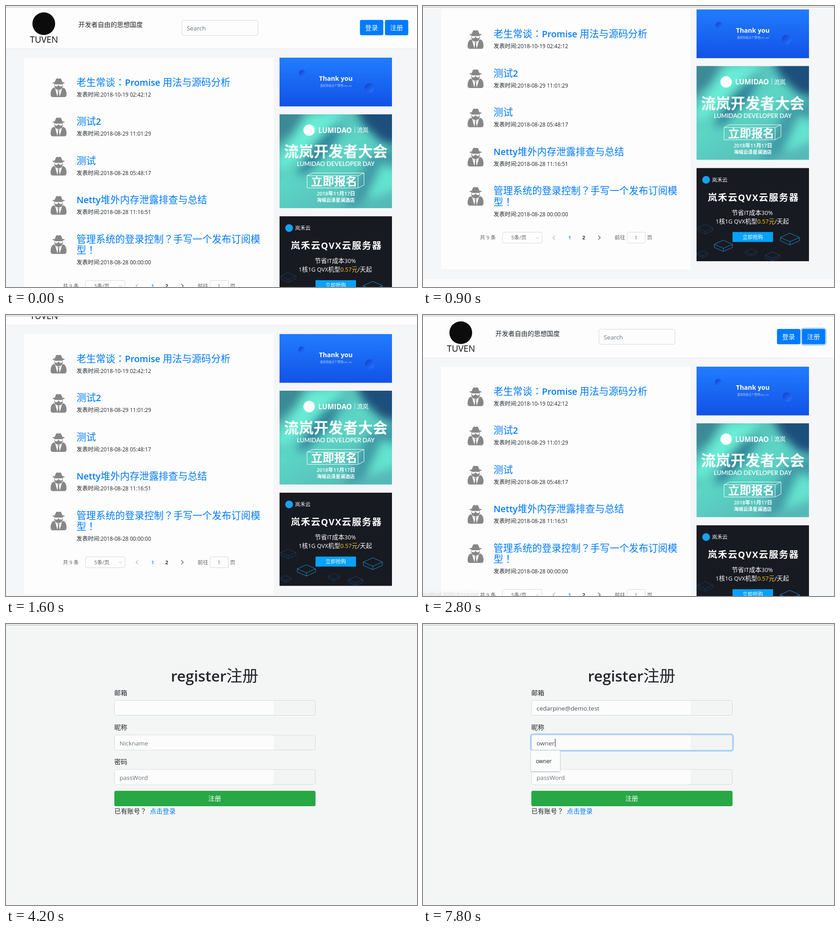
Recreate the animation shown at these times as an HTML page. Size 903x620 px, loop 8 s.

```html
<!DOCTYPE html>
<html lang="zh-CN">
<head>
<meta charset="utf-8">
<title>Community page</title>
<style>
html, body { margin: 0; width: 100%; height: 100%; overflow: hidden; background: #f4f6f6; }
svg { display: block; }
text { font-family: "Open Sans", "Noto Sans CJK SC", sans-serif; white-space: pre; }
tspan { font-size: 95%; }
.head tspan { font-size: 93%; font-weight: 600; }
.price { font-size: 100%; fill: #ffd21f; }
.mark, .head .mark { font-family: "Noto Sans CJK JP", sans-serif; font-size: 100%; font-weight: 400; }
</style>
</head>
<body>
<svg id="stage" width="903" height="620" viewBox="0 0 903 620">
  <defs>
    <linearGradient id="blue" x2="0" y2="1"><stop stop-color="#217cff"/><stop offset="1" stop-color="#1252e6"/></linearGradient>
    <linearGradient id="ball" x2="1" y2="1"><stop stop-color="#0b3fd0"/><stop offset="1" stop-color="#2b78ff"/></linearGradient>
    <linearGradient id="sky" x2=".7" y2="1"><stop stop-color="#4aa3ab"/><stop offset=".5" stop-color="#5cd6c5"/><stop offset="1" stop-color="#55b9b7"/></linearGradient>
    <filter id="blur" x="-50%" y="-50%" width="200%" height="200%"><feGaussianBlur stdDeviation="10"/></filter>
    <filter id="drop" x="-20%" y="-20%" width="140%" height="140%"><feDropShadow dx="0" dy="1" stdDeviation="1.5" flood-opacity=".35"/></filter>
    <g id="spy">
      <path fill="#878787" d="M9 9 12 2Q13.500 0 17.500 1.500 21.500 0 23 2L26 9Q31 9.500 31 10.500 31 12.500 17.500 12.500 4 12.500 4 10.500 4 9.500 9 9ZM8 12.500H27V17Q26 23 22 25L17.500 27 13 25Q9 23 8 17ZM7 21Q0 24 0 36 0 42 5 42H30Q35 42 35 36 35 24 28 21L17.500 28Z"/>
      <path fill="#fdfdfd" d="M8.500 14H26.500V16Q25 19 22 18.500 19 18.500 18.300 15.500H16.700Q16 18.500 13 18.500 10 19 8.500 16ZM10 23.500 15 41 16.500 30 15 27.500 17.500 26.500 20 27.500 18.500 30 20 41 25 23.500 17.500 27Z"/>
    </g>
  </defs>
  <g id="home"></g>
  <g id="form"></g>
  <rect width="903" height="2" fill="#fdfdfd"/>
  <rect y="1.700" width="903" height="1.300" fill="#b9b9bb"/>
</svg>
<script>
const $ = id => document.getElementById(id);
const INK = '#212529', LINK = '#007bff', MUTED = '#6c757d', GREY = '#999', LINE = '#d3d7db';

// Latin runs are set a little smaller than the CJK around them; {…} marks the price.
const text = (x, y, size, str, fill = INK, attrs = '') =>
  `<text x="${x}" y="${y}" font-size="${size}" fill="${fill}" ${attrs}>` +
  str.replace(/[ -z|~]+/g, '<tspan>$&</tspan>')
    .replace(/[：？！]/g, '<tspan class="mark" lang="ja">$&</tspan>')
    .replace('{', '<tspan class="price">').replace('}', '</tspan>') + '</text>';
const mid = (x, y, size, str, fill, attrs = '') => text(x, y, size, str, fill, 'text-anchor="middle" ' + attrs);
const rect = (x, y, w, h, fill, attrs = '') =>
  `<rect x="${x}" y="${y}" width="${w}" height="${h}" fill="${fill}" ${attrs}/>`;
const field = (x, y, w, h, fill = '#fdfdfd') => rect(x + .5, y + .5, w - 1, h - 1, fill, `rx="3.5" stroke="${LINE}"`);
const circle = (x, y, r, fill, attrs = '') => `<circle cx="${x}" cy="${y}" r="${r}" fill="${fill}" ${attrs}/>`;
const path = (d, stroke, attrs = '') => `<path d="${d}" fill="none" stroke="${stroke}" ${attrs}/>`;
const ring = (id, x, y, w, h) =>
  rect(x - 1.3, y - 1.3, w + 2.6, h + 2.6, 'none', `id="${id}" rx="5" stroke="#80bdff" stroke-opacity=".65" stroke-width="3.2"`);

function header() {
  return rect(0, 0, 903, 94, '#fdfdfd') + rect(0, 94, 903, 1, '#e6e8f1') +
    circle(83, 39, 25, '#0c0c0c') + mid(83.5, 81, 20.5, 'TUVEN', '#111') +
    text(159, 46, 14.15, '开发者自由的思想国度') +
    field(386, 31, 168, 34) + text(397, 54, 14.15, 'Search', MUTED) +
    rect(777.7, 30.8, 51.3, 33.8, LINK, 'rx="3.5"') + mid(803.2, 53, 14.15, '登录', '#fff') +
    rect(832.5, 30.8, 51.3, 33.8, LINK, 'rx="3.5" id="join"') + mid(858, 53, 14.15, '注册', '#fff') +
    ring('joinRing', 832.5, 30.8, 51.3, 33.8);
}

function posts() {
  const list = [
    ['老生常谈：Promise 用法与源码分析', '2018-10-19 02:42:12'],
    ['测试2', '2018-08-29 11:01:29'],
    ['测试', '2018-08-28 05:48:17'],
    ['Netty堆外内存泄露排查与总结', '2018-08-28 11:16:51'],
    ['管理系统的登录控制？手写一个发布订阅模|型！', '2018-08-28 00:00:00']];
  return list.map(([title, date], i) => {
    const y = i * 86.5, lines = title.split('|'), last = (lines.length - 1) * 24.6;
    return `<use href="#spy" x="98" y="${159 + y}"/>` +
      lines.map((s, n) => text(155, 175.5 + y + n * 24.6, 21.25, s, LINK, 'class="head"')).join('') +
      text(155, 199.5 + y + last, 12.4, '发表时间:' + date);
  }).join('');
}

function pager() {
  const y = 621.5, c = '#606266', bold = 'font-weight="700"';
  return text(125, y, 11.5, '共 9 条', c) + field(174, 605, 88, 25) + text(194, y, 11.5, '5条/页', c) +
    path('M247.500 616l3.500 3.500 3.500-3.500', '#b8bcc4') +
    path('M290 613l-4.500 4.500 4.500 4.500', '#a8abb2', 'stroke-width="1.2"') +
    mid(322, y, 11.5, '1', '#409eff', bold) + mid(353, y, 11.5, '2', '#303133', bold) +
    path('M385 613l4.500 4.500-4.500 4.500', '#444', 'stroke-width="1.2"') +
    text(421, y, 11.8, '前往', c) + field(448, 605, 41, 25) + mid(468, y, 11.8, '1', c) + text(492, y, 11.8, '页', c);
}

function thanks() {
  return rect(601, 114, 247, 107.5, 'url(#blue)') +
    circle(0, 0, 7.5, 'url(#ball)', 'id="ballA"') + circle(0, 0, 10.5, 'url(#ball)', 'id="ballB"') +
    mid(724.7, 165, 14.9, 'Thank you', '#fff', 'font-weight="700"') +
    mid(725, 178, 6.3, '喜欢你就点个赞吧Lan_vo', '#b9d0ff');
}

function aurora() {
  const w = '#fff';
  return `<svg x="601" y="239" width="247" height="207" viewBox="0 0 247 207">
    <rect width="247" height="207" fill="url(#sky)"/>
    <g filter="url(#blur)">
      <path fill="#1d4f7c" d="M165-20H270V70L225 62 185 25Z"/>
      <path fill="#3b8a96" d="M-20-20H60L30 40-20 75Z"/>
      <path fill="#2f8298" d="M90 40 140 25 110 80 60 130 35 135Z"/>
      <path fill="#69ecd5" d="M65 0 150-10 85 55 10 125-10 110Z"/>
      <path fill="#3f9aa5" d="M195 95 260 70V115L205 180 140 215Z"/>
      <path fill="#64e3cf" d="M225 110 260 125V165L190 190Z"/>
    </g></svg>` +
    circle(666, 274, 12.5, w) +
    text(686, 279.5, 16.3, 'LUMIDAO', w, 'font-weight="700"') + path('M766.500 266v14', '#d5f3f0') +
    text(771, 278, 12.8, '流岚', w) +
    mid(724.5, 333, 32.5, '流岚开发者大会', w, 'font-weight="900"') +
    mid(724.5, 353, 14, 'LUMIDAO DEVELOPER DAY', w, 'font-weight="600" style="font-family:Lato,sans-serif"') +
    path('M661.500 374.500H773.500V401.500H661.500ZL674 368.500H786.500L773.500 374.500M786.500 368.500V395L773.500 401.500', w) +
    mid(721, 396, 25.5, '立即报名', w, 'font-weight="700"') +
    mid(725, 418, 11.5, '2018年11月17日', w, 'font-weight="600"') +
    mid(724.5, 432, 10.4, '海城云泽星澜酒店', w, 'font-weight="700"');
}

function cloud() {
  const chip = (x, y, r, c) => path(`M${x - r} ${y}l${r}-${r * .45} ${r} ${r * .45}-${r} ${r * .45}ZV${y + r * .35}l${r} ${r * .45} ${r}-${r * .45}V${y}M${x} ${y + r * .45}v${r * .35}`, c);
  return rect(601, 464, 247, 205.5, '#181a21') +
    chip(620, 596, 17, '#144064') + chip(660, 632, 20, '#1d8fd8') + chip(806, 617, 21, '#1d8fd8') +
    chip(721, 648, 13, '#153d60') + chip(768, 656, 16, '#134a78') + chip(614, 652, 12, '#153d60') +
    circle(622, 490, 8.5, '#18a1f3') + text(635, 494, 11.4, '岚禾云', '#fff') +
    mid(726, 536, 20.5, '岚禾云QVX云服务器', '#fff', 'font-weight="700" letter-spacing="1.6"') +
    mid(723.5, 567, 13.6, '节省IT成本30%', '#fff') +
    mid(723.5, 586, 13.3, '1核1G QVX机型{0.57元}/天起', '#fff') +
    rect(680, 605, 89, 22, '#06a2fb') + mid(724.5, 620, 11.2, '立即抢购', '#fff');
}

function footer() {
  const y = 807.5, t = (x, y, s, c = GREY) => text(x, y, 11.5, s, c);
  return rect(0, 708.5, 903, 179.5, '#fbfbfb') +
    t(27, 741.5, '顾闻川', '#444') + t(65, 741.5, '|', '#ccc') + t(71, 741.5, '源码地址', '#444') +
    t(27, 762, '技术开发者的社区，持续更新完善，测试版本V1.0。') +
    t(27, y, '服务器赞助商为') + text(112, y + 4, 19.5, 'VORELA', '#45474f', 'font-weight="800"') +
    t(195, y, '，存储赞助商为') + circle(305, 804.5, 16, '#12a5e4') +
    text(331, 803, 16, '九禾云', '#12a5e4', 'font-weight="700"') +
    text(331, 819, 17, 'JOVEL', '#12a5e4', 'font-weight="700"') +
    t(383, y, '，由') + circle(428, 804.5, 19, '#6262d2') + text(453, 812, 27, 'orbimel', '#8787df') +
    t(552, y, '提供应用性能服务。') +
    t(27, 855.5, '仅供开发者学习使用，未经授权，不得商用。联系邮箱：weiqinglabs@mail.test');
}

$('home').innerHTML = '<g id="page">' + rect(0, 0, 903, 900, '#f5f6f8') + header() +
  rect(40, 114, 548, 573, '#fdfdfd') + posts() + pager() + thanks() + aurora() + cloud() + footer() + '</g>' +
  '<g id="status">' + rect(-5, 605, 128, 16, '#f2f2f2') + text(-4, 619.5, 11.5, 'localhost:8080/#/register', '#666') + '</g>';

function input(id, y) {
  return field(238, y, 442, 34, '#f3f5f5') + rect(239, y + 1, 349, 32, '#fcfcfc', 'rx="3"') +
    ring(id + 'Ring', 238, y, 442, 34) + text(249.5, y + 23, 14.15, '', MUTED, `id="${id}"`);
}
$('form').innerHTML = rect(0, 0, 903, 620, '#f4f6f5') +
  mid(458.5, 127, 35.3, 'register注册', INK, 'class="head"') +
  text(238, 157, 14.15, '邮箱') + input('mail', 168) +
  text(238, 232.5, 14.15, '昵称') + input('nick', 244.5) +
  text(238, 308.5, 14.15, '密码') + input('pass', 320.5) +
  rect(238, 368, 442, 34, '#28a745', 'rx="3.5"') + mid(458.5, 390, 14.15, '注册', '#fff') +
  text(238, 418, 14.15, '已有账号？') + text(316, 418, 14.15, '点击登录', LINK) +
  '<g id="menu">' + rect(237, 279, 75, 173, '#fafbfb', 'id="menuBox" rx="2.5" filter="url(#drop)"') +
  ['owner', 'noon', 'lalala', 'tohan', 'tohans'].map((s, i) => text(248, 306.5 + i * 31.8, 12.4, s)).join('') + '</g>' +
  rect(250, 253, 1, 18, '#222', 'id="caret"');

const clamp = v => Math.max(0, Math.min(1, v));
const show = (id, on) => $(id).setAttribute('opacity', +on);
const set = (id, attrs) => { for (const k in attrs) $(id).setAttribute(k, attrs[k]); };

// Two quick wheel flicks, each 300 ms and easing out: down to the end, then back up.
const flick = (t, start) => {
  const p = clamp((t - start) / 300);
  return p * (1.29 - .29 * p);
};
const scrollAt = t => 267.5 * (flick(t, 800) - flick(t, 1400));

function write(id, value, hint) {
  const el = $(id);
  el.innerHTML = `<tspan>${value || hint}</tspan>`;
  el.setAttribute('fill', value ? '#495057' : MUTED);
  return value ? el.getComputedTextLength() + 1 : 0.5;
}

function drawHome(t) {
  $('page').setAttribute('transform', `translate(0 ${-scrollAt(t)})`);
  const a = t / 900;
  set('ballA', { cx: 650 + Math.cos(a), cy: 148.5 + .5 * Math.sin(a) });
  set('ballB', { cx: 799.3 - .8 * Math.cos(a), cy: 181 - .5 * Math.sin(a) });
  show('joinRing', clamp((t - 2500) / 200));
  set('join', { fill: t >= 2400 && t < 2700 || t >= 3900 ? '#0069d9' : LINK });
  show('status', t < 2700 ? clamp((t - 2300) / 200) : clamp((3000 - t) / 800));
}

function drawForm(t) {
  const typed = 'owner'.slice(0, [7300, 7400, 7600, 7700, 7800].filter(s => t >= s).length);
  const onNick = t >= 5500;
  const mailEnd = write('mail', t >= 5000 ? 'cedarpine@demo.test' : '', '');
  const nickEnd = write('nick', typed, 'Nickname');
  write('pass', '', 'passWord');
  show('mailRing', t < 5500 ? clamp((t - 4700) / 200) : clamp((5600 - t) / 200));
  show('nickRing', clamp((t - 5400) / 200));
  show('passRing', 0);

  show('menu', t >= 5600);
  set('menuBox', typed ? { width: 64, height: 46 } : { width: 75, height: 173 });
  [...$('menu').querySelectorAll('text')].forEach((el, i) => el.setAttribute('opacity', +(!i || !typed)));

  const blink = t >= 7300 || t < 6100 || t >= 6600 && t < 7100;
  show('caret', t >= 4800 && blink);
  set('caret', { x: Math.round(249.5 + (onNick ? nickEnd : mailEnd)), y: onNick ? 253 : 177 });
}

function frame() {
  const t = Math.floor(performance.now() % 8000 / 100) * 100;
  const home = t < 4100;
  $('home').style.display = home ? '' : 'none';
  $('form').style.display = home ? 'none' : '';
  (home ? drawHome : drawForm)(t);
  requestAnimationFrame(frame);
}
frame();
</script>
</body>
</html>
```
